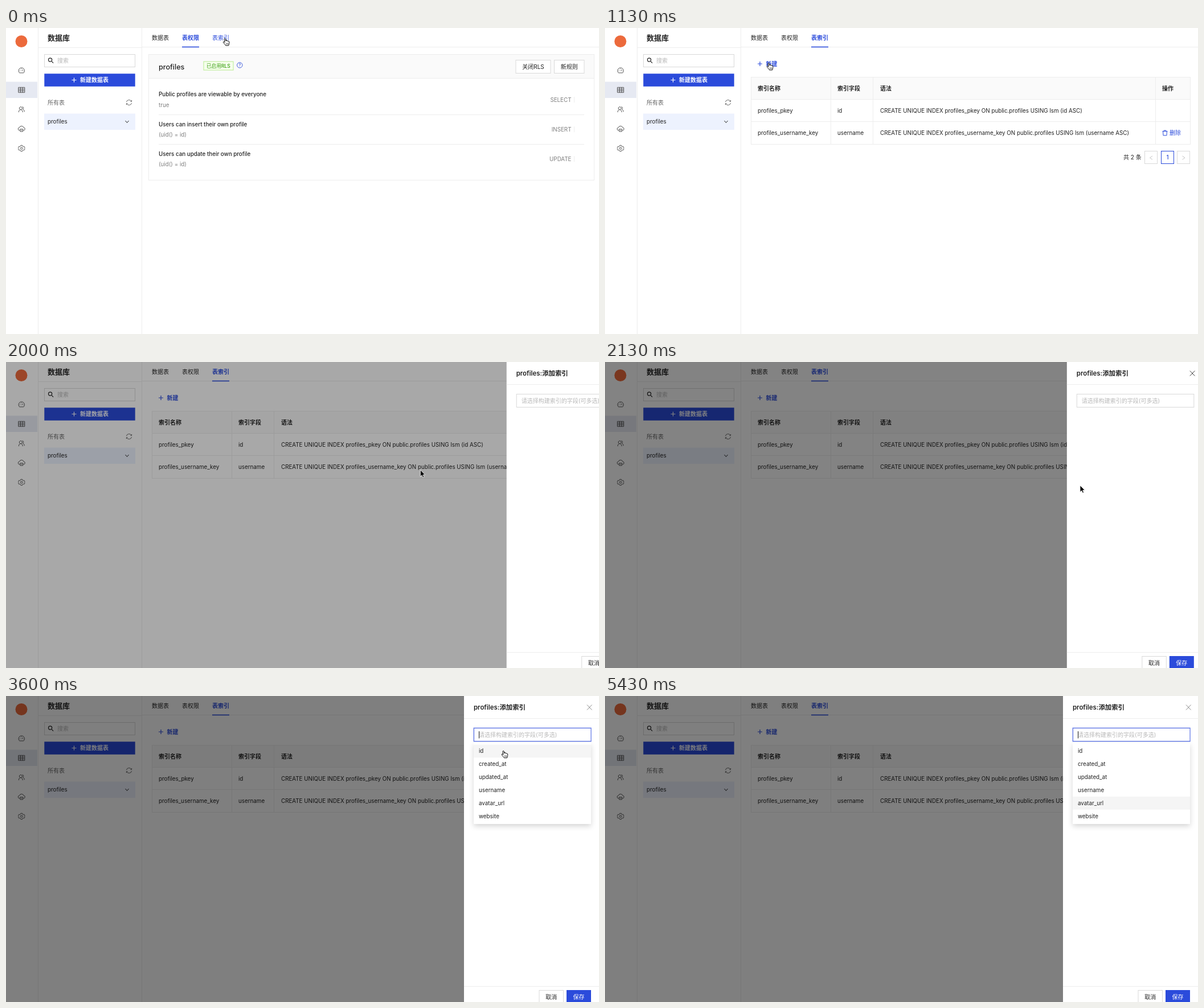
An HTML page for the animation above (5.46 s loop, 1041x538 px).

```html
<!DOCTYPE html>
<html lang="zh-CN">
<head>
<meta charset="utf-8">
<style>
html, body { margin: 0; width: 100%; height: 100%; overflow: hidden; background: #fff; }
svg { display: block; width: 1041px; height: 538px; }
text { font-family: Inter, "Noto Sans CJK SC", "Noto Sans CJK", sans-serif; white-space: pre; }
</style>
</head>
<body>
<svg id="stage" viewBox="0 0 1041 538" xmlns="http://www.w3.org/2000/svg"></svg>
<script>
const LOOP = 5460, BLUE = '#2b4bdb', INK = '#222', LINE = '#ededed', EDGE = '#d9d9d9';
const stage = document.getElementById('stage');

// Markup helpers
const textSize = s => /[\u4e00-\u9fff]/.test(s) ? 10 : 9.8;
const text = (x, y, s, o = {}) =>
  `<text x="${x}" y="${y}" font-size="${o.size || textSize(s)}" font-weight="${o.w || 400}" fill="${o.fill || INK}"` +
  ` text-anchor="${o.anchor || 'start'}"${o.id ? ` id="${o.id}"` : ''}>${s}</text>`;
const rect = (x, y, w, h, fill, extra = '') =>
  `<rect x="${x}" y="${y}" width="${w}" height="${h}" fill="${fill}" ${extra}/>`;
const box = (x, y, w, h, stroke = EDGE, fill = '#fff') => rect(x + .5, y + .5, w, h, fill, `stroke="${stroke}"`);
const hline = (x, y, w, c = LINE) => rect(x, y, w, 1, c);
const vline = (x, y, h, c = LINE) => rect(x, y, 1, h, c);
const path = (d, c = INK, w = 1, extra = '') =>
  `<path d="${d}" fill="none" stroke="${c}" stroke-width="${w}" ${extra}/>`;
const at = (x, y, s) => `<g transform="translate(${x} ${y})">${s}</g>`;
const group = (id, s) => `<g id="${id}">${s}</g>`;
const plus = (x, y, c) => path(`M${x - 4} ${y}h8M${x} ${y - 4}v8`, c, 1.2);
const button = (x, y, w, h, label) =>
  box(x, y, w, h) + text(x + w / 2 + .5, y + h / 2 + 4, label, { anchor: 'middle' });

const icons = {
  gauge: path('M-3.6 4.2A5.2 5.2 0 1 1 3.6 4.2ZM0 .8L2.3-1.6M-3.4 .6h.9M3.4 .6h-.9M0-3.5v.9M-2.4-2.1l.6.6', '#434343', .9),
  grid: path('M-5.5-4.5h11v9h-11zM-5.5-1.5h11M-5.5 1.5h11M-1.8-4.5v9M1.8-4.5v9', '#434343', .9),
  team: path('M-5 5c0-3 1.6-4.5 3.5-4.5S2 2 2 5M-1.5 .5a2.5 2.5 0 1 1 .2 0M1.3-4.6a2.4 2.4 0 0 1 1 4.4M2.3-.1C4.2 .6 5 2.4 5.1 4.2', '#434343', .9),
  cloud: path('M-3 2.6h-.4a2.4 2.4 0 0 1-.4-4.8a4 4 0 0 1 7.6 0a2.4 2.4 0 0 1-.4 4.8H3M-2.4 .5h4.8v4.2h-4.8zM-1 2.6h2', '#434343', .9),
  gear: path('M-1.4-5.2h2.8l.4 1.5 1.2.7 1.5-.4 1.3 2.3-1.1 1.1 1.1 1.1-1.3 2.3-1.5-.4-1.2.7-.4 1.5h-2.8l-.4-1.5-1.2-.7-1.5.4-1.3-2.3 1.1-1.1-1.1-1.1 1.3-2.3 1.5.4 1.2-.7z', '#434343', .9) +
    '<circle r="1.8" fill="none" stroke="#434343" stroke-width=".9"/>',
  search: path('M1.6 1.6L4.6 4.6M2.2-1a3.1 3.1 0 1 1-6.2 0a3.1 3.1 0 1 1 6.2 0', INK, 1.2),
  reload: path('M-4.6-.8A4.7 4.7 0 0 1 4.2-2M4.6 .8A4.7 4.7 0 0 1-4.2 2M4.6-4v2.2H2.4M-4.6 4V1.8h2.2', '#595959', .9),
  trash: path('M-4.5-2.8h9M-1.8-2.8v-1.6h3.6v1.6M-3.4-2.8l.4 7.2h6l.4-7.2', BLUE, 1),
};

function sidebar() {
  const nav = ['gauge', 'grid', 'team', 'cloud', 'gear'];
  return '<circle cx="27" cy="23.5" r="10.5" fill="#ec6a3c"/>' +
    rect(0, 94.5, 55, 28.5, '#e6e9f2') +
    nav.map((n, i) => at(27.3, 74.7 + i * 34.2, icons[n])).join('') +
    vline(56, 0, 538) + vline(238, 0, 538) + hline(57, 34, 181) +
    text(73, 21.5, '数据库', { size: 13, w: 600 }) +
    box(67, 46, 159, 22) + at(78.5, 57, icons.search) + text(90, 61, '搜索', { fill: '#b8b8b8' }) +
    rect(67.3, 80.3, 159.4, 22.5, BLUE) + plus(119.5, 91.5, '#fff') + text(130, 95.3, '新建数据表', { fill: '#fff', w: 600 }) +
    text(73, 134.8, '所有表', { fill: '#666' }) + at(216, 131, icons.reload) +
    rect(67, 150.5, 160, 28.5, '#edf2fe') + text(73, 168.3, 'profiles') + path('M209.5 163l3 3.6 3-3.6', INK, 1);
}

function tabs() {
  return hline(239, 33, 802) + text(256, 21, '数据表') +
    text(309, 21, '表权限', { id: 'tabRules' }) + text(362, 21, '表索引', { id: 'tabIndex' }) +
    rect(309, 32.6, 30, 1.6, BLUE, 'id="ink"');
}

function rulesPage() {
  const rules = [
    ['Public profiles are viewable by everyone', 'true', 'SELECT'],
    ['Users can insert their own profile', '(uid() = id)', 'INSERT'],
    ['Users can update their own profile', '(uid() = id)', 'UPDATE'],
  ];
  return box(250, 46, 782, 221, LINE) + rect(251, 47, 781, 42, '#fafafa') + hline(251, 88, 781) +
    text(268, 72.5, 'profiles', { size: 12.6, w: 500 }) +
    box(346.5, 58.5, 52, 15, '#b7eb8f', '#f6ffed') + text(352, 69.5, '已启用RLS', { size: 8.6, w: 500, fill: '#389e0d' }) +
    `<circle cx="410.3" cy="65.3" r="4.7" fill="none" stroke="${BLUE}" stroke-width=".9"/>` +
    text(410.3, 67.8, '?', { size: 7, fill: BLUE, anchor: 'middle', w: 500 }) +
    button(894.5, 56, 61, 23, '关闭RLS') + button(962, 56, 52.5, 23, '新规则') +
    rules.map(([name, test, verb], i) => {
      const y = i * 52.2;
      return text(268, 120.3 + y, name, { w: 500 }) + text(268, 138.8 + y, test, { fill: '#7f7f7f' }) +
        text(992.5, 129.6 + y, verb, { fill: '#7f7f7f', anchor: 'end' }) + vline(997, 121 + y, 10) +
        (i < 2 ? hline(268, Math.round(152 + y), 747) : '');
    }).join('');
}

function indexPage() {
  const cols = [268, 408, 483, 978];
  const row = (y, cells, w) => cells.map((c, i) => text(cols[i], y, c, { w })).join('');
  const sql = (name, col) => `CREATE UNIQUE INDEX ${name} ON public.profiles USING lsm (${col} ASC)`;
  const frame = (y, h) => [256, 396, 470, 966, 1027].map(x => vline(x, y, h)).join('');
  const page = (x, c, mark) => box(x, 216, 22, 22, c) + mark;
  const rows = frame(125, 80) + hline(256, 164, 771) + hline(256, 204, 771) +
    row(149, ['profiles_pkey', 'id', sql('profiles_pkey', 'id')]) +
    row(188.3, ['profiles_username_key', 'username', sql('profiles_username_key', 'username')]) +
    at(983, 184.5, icons.trash) + text(991, 188.3, '删除', { fill: BLUE }) +
    text(910, 230.6, '共 2 条') +
    page(947, EDGE, path('M961 225l-4.5 3.2 4.5 3.2', '#bfbfbf', .9)) +
    page(976, BLUE, text(987.5, 231.2, '1', { fill: BLUE, w: 500, anchor: 'middle' })) +
    page(1004, EDGE, path('M1013.5 225l4.5 3.2-4.5 3.2', '#bfbfbf', .9));
  return plus(272, 63, BLUE) + text(282.5, 66.7, '新建', { fill: BLUE, w: 600 }) +
    rect(256, 86, 771, 39, '#fafafa') + hline(256, 86, 771) + hline(256, 125, 771) + frame(86, 39) +
    row(109.5, ['索引名称', '索引字段', '语法', '操作'], 600) + group('rows', rows);
}

function drawer() {
  const fields = ['id', 'created_at', 'updated_at', 'username', 'avatar_url', 'website'];
  const menu = rect(821, 82.5, 206, 142.5, '#fff', 'filter="url(#shade)"') +
    rect(821, 0, 206, 22.9, '#f5f5f5', 'id="hover"') +
    fields.map((f, i) => text(830, 100.3 + i * 22.85, f)).join('');
  return rect(804, 0, 240, 538, '#fff') + text(821, 23.8, 'profiles:添加索引', { size: 11.4, w: 600 }) +
    path('M1020 15.5l8.6 9M1028.6 15.5l-8.6 9', '#404040', 1, 'id="close"') + hline(804, 39, 237) +
    rect(820, 55, 208, 26, '#d5dbf8', 'id="glow"') +
    rect(821.5, 56.5, 205.5, 23, '#fff', `stroke="${EDGE}" id="field"`) +
    text(830, 71.8, '请选择构建索引的字段(可多选)', { fill: '#b8b8b8' }) +
    vline(830, 62, 12.5, INK).replace('<rect', '<rect id="caret"') +
    group('menu', menu) +
    hline(804, 510, 237) + button(935.5, 517, 42.5, 23, '取消') +
    rect(984, 517, 43, 23, BLUE) + text(1005.5, 532.5, '保存', { fill: '#fff', anchor: 'middle' });
}

const pointers = group('arrow',
    '<path d="M0 0V11.8L2.7 9.3 4.5 13.4 6.5 12.5 4.7 8.5H8.3Z" fill="#000" stroke="#fff" stroke-width=".8"/>') +
  group('hand',
    '<path d="M.2 1.2C.2-.3 2.2-.3 2.4 1L3 4.4C4-.0 5 4 5.1 4.6 5.6 3.7 7 4 7.1 5 8.2 4.4 9 5.2 8.9 6.5 8.9 9 8.4 9.6 7.8 12.3H2.5C1.9 10.4-.4 8.8-1.6 6.9-2.2 5.8-.8 5 .2 6.2L1 7Z" fill="#fff" stroke="#000" stroke-width="1"/>' +
    path('M3.7 8v2.6M5.2 8v2.6M6.7 8v2.6', '#000', .6)) +
  group('beam', path('M-2.8-5.5Q0-5.5 0-4V4Q0 5.5-2.8 5.5M2.8-5.5Q0-5.5 0-4M0 4Q0 5.5 2.8 5.5M-1.3 1.5h2.6', '#222', 1));

stage.innerHTML = '<defs><filter id="shade" x="-20%" y="-20%" width="140%" height="150%">' +
  '<feDropShadow dx="0" dy="4" stdDeviation="5" flood-opacity=".16"/></filter></defs>' +
  rect(0, 0, 1041, 538, '#fff') + sidebar() + tabs() + group('rules', rulesPage()) + group('indexes', indexPage()) +
  rect(0, 0, 1041, 538, '#000', 'id="mask"') + group('drawer', drawer()) + group('pointer', pointers);

const el = {};
stage.querySelectorAll('[id]').forEach(n => el[n.id] = n);
const set = (id, attrs) => { for (const k in attrs) el[id].setAttribute(k, attrs[k]); };
const show = (id, on) => set(id, { visibility: on ? 'inherit' : 'hidden' });
const clamp = (v, a = 0, b = 1) => Math.min(b, Math.max(a, v));

// cubic-bezier(.25, .1, .25, 1)
function ease(p) {
  p = clamp(p);
  if (p === 0 || p === 1) return p;
  const curve = (a, b, u) => 3 * a * u * (1 - u) ** 2 + 3 * b * u * u * (1 - u) + u ** 3;
  let lo = 0, hi = 1;
  for (let i = 0; i < 24; i++) {
    const mid = (lo + hi) / 2;
    if (curve(.25, .25, mid) < p) lo = mid; else hi = mid;
  }
  return curve(.1, 1, lo);
}

// Pointer hot spot: time, x, y
const track = [
  [0, 383, 18.5], [420, 383, 18.5], [1000, 286, 61.5], [1640, 286, 61.5], [1930, 636.5, 153.5], [2000, 726.5, 189.5],
  [2200, 858, 222], [2700, 870, 73], [3420, 870, 73], [3950, 880, 190], [4330, 889.5, 260],
  [4560, 891, 256], [4800, 893, 186], [LOOP, 893, 186],
];
function slope(i, k) {
  const a = track[i - 1], b = track[i], c = track[i + 1];
  if (!a || !c) return 0;
  const l = (b[k] - a[k]) / (b[0] - a[0]), r = (c[k] - b[k]) / (c[0] - b[0]);
  return l * r <= 0 ? 0 : 2 * l * r / (l + r);
}
function pointerAt(t) {
  let i = 0;
  while (i < track.length - 2 && t >= track[i + 1][0]) i++;
  const a = track[i], b = track[i + 1], d = b[0] - a[0], u = (t - a[0]) / d;
  return [1, 2].map(k =>
    a[k] * (1 + 2 * u) * (1 - u) ** 2 + slope(i, k) * d * u * (1 - u) ** 2 +
    b[k] * u * u * (3 - 2 * u) - slope(i + 1, k) * d * u * u * (1 - u));
}

const SWITCH = 320, LOADED = 640, OPEN = 1864.5, FOCUS = 3180, AWAY = 4950;

function draw(t) {
  const onIndex = t >= SWITCH, focused = t >= FOCUS;
  show('rules', !onIndex);
  show('indexes', onIndex);
  show('rows', t >= LOADED);
  set('tabRules', { fill: onIndex ? INK : BLUE, 'font-weight': onIndex ? 400 : 600 });
  set('tabIndex', { fill: BLUE, 'font-weight': onIndex ? 600 : 400 });
  set('ink', { x: 309 + 53 * ease((t - SWITCH) / 300) });

  const slide = ease((t - OPEN) / 340);
  set('mask', { opacity: .5 * slide });
  show('drawer', slide > 0);
  set('drawer', { transform: `translate(${237 * (1 - slide)} 0)` });
  set('close', { stroke: focused ? '#8c8c8c' : '#404040' });
  set('field', { stroke: focused ? '#4f68e3' : EDGE });
  show('glow', focused);
  show('caret', focused && (t - FOCUS) % 1000 < 500);

  const [x, y] = pointerAt(t), drop = clamp((t - FOCUS) / 200), k = .8 + .2 * ease(drop);
  show('menu', drop > 0);
  set('menu', { opacity: drop, transform: `translate(0 ${82.5 * (1 - k)}) scale(1 ${k})` });
  set('hover', { y: 85.5 + 22.85 * clamp(Math.floor((y - 85.5) / 22.85), 0, 5) });

  const inside = (l, tp, r, b) => x > l && x < r && y > tp && y < b;
  const beam = slide === 1 && inside(821, 56, 1027, 80);
  const hand = slide === 0 && (inside(250, 0, 395, 34) || inside(262, 52, 306, 74)) ||
    focused && inside(821, 85, 1027, 223);
  show('pointer', t < AWAY);
  set('pointer', { transform: `translate(${x} ${y})` });
  show('beam', beam);
  show('hand', hand);
  show('arrow', !beam && !hand);
}

const start = performance.now();
function tick() {
  draw((performance.now() - start) % LOOP);
  requestAnimationFrame(tick);
}
draw(0);
requestAnimationFrame(tick);
</script>
</body>
</html>
```
